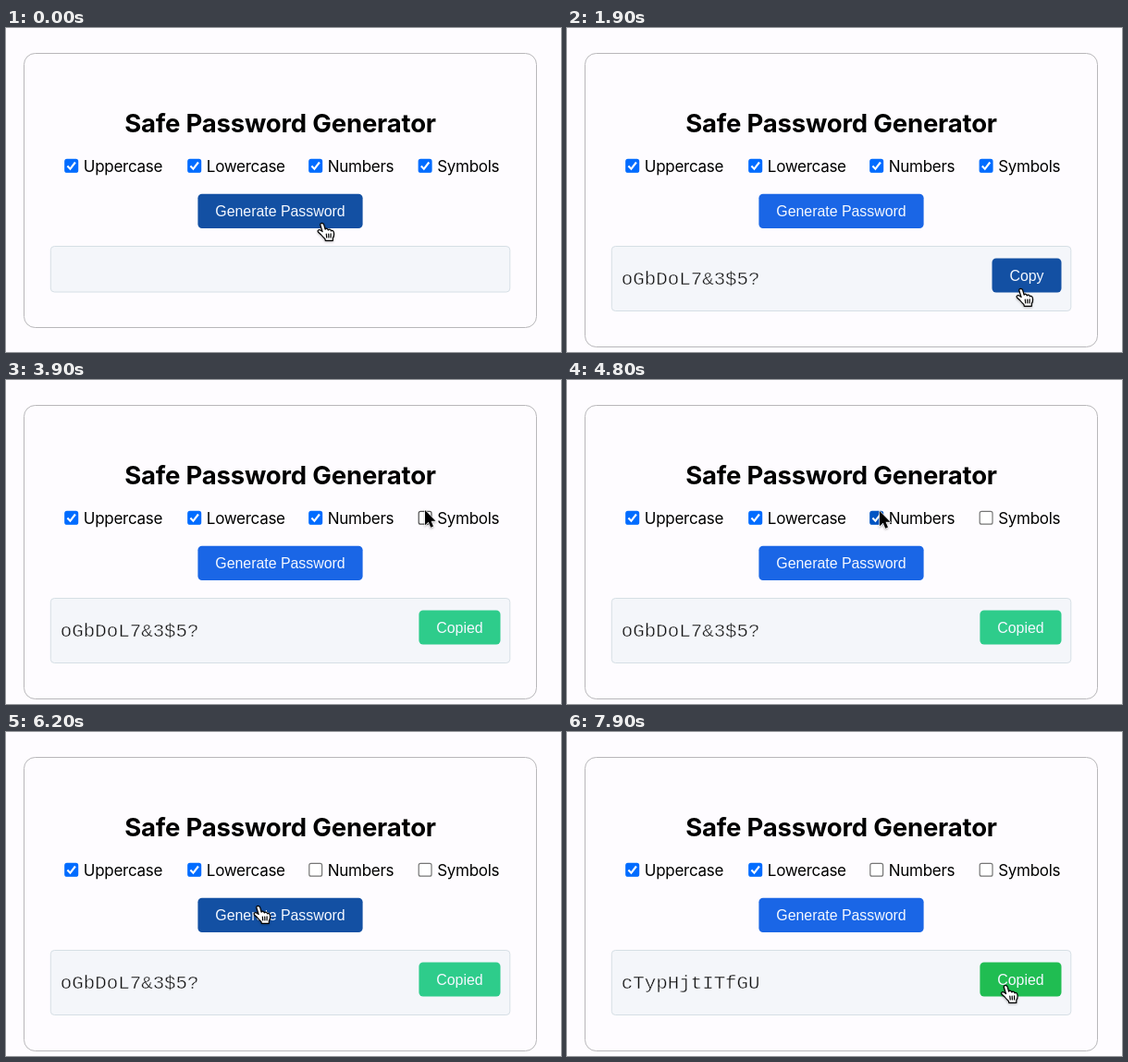
Recreate the animation shown at these times as an HTML page. Size 600 by 351 pixels, loop 8000 ms.

```html
<!DOCTYPE html>
<html lang="en">
<head>
<meta charset="utf-8">
<title>Safe Password Generator</title>
<style>
  html, body { margin: 0; width: 100%; height: 100%; overflow: hidden; background: #fefcff; }
  svg { display: block; width: 600px; height: 351px; }
  .card { fill: #fefcff; stroke: #b8b7ba; }
  .title { font: 700 27.5px Inter, sans-serif; letter-spacing: -.18px; text-anchor: middle; }
  .label { font: 17px Inter, sans-serif; letter-spacing: -.28px; }
  .result { fill: #f4f6fa; stroke: #d6dfe5; }
  .password { font: 20.8px "Liberation Mono", monospace; fill: #111; stroke: #f4f6fa; stroke-width: .5; }
  .button rect { fill: #1a66e6; }
  .button text { font: 15.9px "Liberation Sans", Arial, sans-serif; fill: #f4f8ff; text-anchor: middle; }
  .button.hover rect { fill: #1350a3; }
  .button.done rect { fill: #2ecc8b; }
  .button.done.hover rect { fill: #20bd52; }
  .box rect { fill: #fff; stroke: #767676; stroke-width: 1.2; }
  .box path { fill: none; stroke: #fff; stroke-width: 2.1; }
  .box.hover rect { stroke: #4f4f4f; }
  .box.on rect { fill: #006cff; stroke: #006cff; }
  .box.on.hover rect { fill: #0055c4; stroke: #0055c4; }
  #cursor { filter: drop-shadow(0 1px 1px rgba(0, 0, 0, .3)); }
  #hand { fill: #fff; stroke: #000; stroke-width: 1.2; stroke-linejoin: round; stroke-linecap: round; }
  #arrow { fill: #000; stroke: #fff; stroke-width: 1.2; paint-order: stroke; }
</style>
</head>
<body>
<svg viewBox="0 0 600 351">
  <rect class="card" id="card" x="19.5" y="27.5" width="554" rx="12"/>
  <text class="title" x="296.5" y="113">Safe Password Generator</text>
  <g id="options"></g>
  <g class="button" id="generate">
    <rect x="207.4" y="179.8" width="178.2" height="37.2" rx="4.5"/>
    <text x="296.5" y="203.5">Generate Password</text>
  </g>
  <rect class="result" id="result" x="48.3" y="236.5" width="496.5" rx="4"/>
  <g id="output">
    <text class="password" id="password" x="58.8" y="278"></text>
    <g class="button" id="copy">
      <rect y="249.4" height="37.2" rx="4.5"/>
      <text y="273.5"></text>
    </g>
  </g>
  <g id="cursor">
    <path id="arrow" d="M0 0V16.3L3.7 12.8L6.2 18.7L9 17.5L6.5 11.8H11.5Z"/>
    <g id="hand" transform="translate(-.8 0)">
      <path d="M-2 2Q-1.8.3 0 .3Q1.6.6 2 2.2L3.4 7.2Q3.8 5.9 5.2 6.3Q6.3 6.6 6.7 8Q7.3 6.9 8.6 7.3Q9.6 7.8 9.9 9Q10.6 8.1 11.7 8.8Q12.8 9.6 12.9 12Q13 14.5 11.6 16.6V19.3H3.6L3.2 17.5Q1 15.5-1 13L-4 10.3Q-5.2 8.8-4 8Q-2.8 7.2-1 8.6L.4 9.6Z"/>
      <path d="M4.6 12.2L5 16M7 12L7.2 16M9.4 11.8V16"/>
    </g>
  </g>
</svg>
<script>
const LOOP = 8000, STEP = 100;
const $ = id => document.getElementById(id);

// Click times
const SHOW = 300, COPY = 2000, SYMBOLS = 3900, NUMBERS = 5000, RENEW = 6300;

// Places the pointer visits; it eases from one to the next
const stops = [
  { from: 0, to: 600, x: 342.5, y: 211 },        // generate
  { from: 800, to: 900, x: 344.5, y: 219.5 },
  { from: 1500, to: 1500, x: 460, y: 298 },
  { from: 1900, to: 2100, x: 491.5, y: 282 },    // copy
  { from: 2400, to: 2400, x: 488, y: 319 },
  { from: 2900, to: 2900, x: 444.5, y: 179 },
  { from: 3700, to: 4300, x: 453, y: 141 },      // symbols
  { from: 4700, to: 5300, x: 338, y: 142 },      // numbers
  { from: 6100, to: 6400, x: 273.5, y: 188 },    // generate again
  { from: 7500, to: LOOP, x: 475, y: 274 }       // copied
];

const options = [
  ["Uppercase", 63.2, LOOP], ["Lowercase", 196.2, LOOP],
  ["Numbers", 327.2, NUMBERS], ["Symbols", 445.6, SYMBOLS]
].map(([name, x, off]) => {
  $("options").insertAdjacentHTML("beforeend",
    `<g class="box"><rect x="${x + .6}" y="142.4" width="13.8" height="13.8" rx="2"/>
     <path d="M${x + 3.2} 149.6l3 3.1l5.5-7.2"/></g>
     <text class="label" x="${x + 20.6}" y="156">${name}</text>`);
  return { x, off, el: $("options").querySelector(".box:last-of-type") };
});

const ease = k => k * k * (3 - 2 * k);

function pointer(t) {
  const i = stops.findIndex(s => t <= s.to), b = stops[i];
  if (t >= b.from) return b;
  const a = stops[i - 1], k = ease((t - a.to) / (b.from - a.to));
  return { x: a.x + (b.x - a.x) * k, y: a.y + (b.y - a.y) * k };
}

const inside = ({ x, y }, left, top, right, bottom) =>
  x >= left && x <= right && y >= top && y <= bottom;

function draw(t) {
  const { x, y } = pointer(t);
  const felt = pointer(Math.max(0, t - STEP)); // hover lags one step
  const shown = t >= SHOW, copied = t >= COPY;

  $("card").setAttribute("height", shown ? 318 : 297);
  $("result").setAttribute("height", shown ? 70 : 49.5);
  $("output").style.display = shown ? "" : "none";
  $("password").textContent = t < RENEW ? "oGbDoL7&3$5?" : "cTypHjtITfGU";

  const left = copied ? 446.4 : 459.5, right = 534.5;
  const [rect, text] = $("copy").children;
  rect.setAttribute("x", left);
  rect.setAttribute("width", right - left);
  text.setAttribute("x", (right + left) / 2);
  text.textContent = copied ? "Copied" : "Copy";

  const onGenerate = inside(felt, 207, 179, 386, 217);
  const onCopy = shown && inside(felt, left, 249, right, 287);
  $("generate").classList.toggle("hover", onGenerate);
  $("copy").classList.toggle("hover", onCopy);
  $("copy").classList.toggle("done", copied);

  for (const { x, off, el } of options) {
    const on = t < off;
    el.classList.toggle("on", on);
    el.classList.toggle("hover", inside(felt, x, 137, x + 15, 157));
    el.lastElementChild.style.display = on ? "" : "none";
  }

  const hand = onGenerate || onCopy;
  $("hand").style.display = hand ? "" : "none";
  $("arrow").style.display = hand ? "none" : "";
  $("cursor").setAttribute("transform", `translate(${x} ${y})`);
}

const start = performance.now();
function tick() {
  const t = (performance.now() - start) % LOOP;
  draw(Math.floor(t / STEP) * STEP);
  requestAnimationFrame(tick);
}
tick();
</script>
</body>
</html>
```
